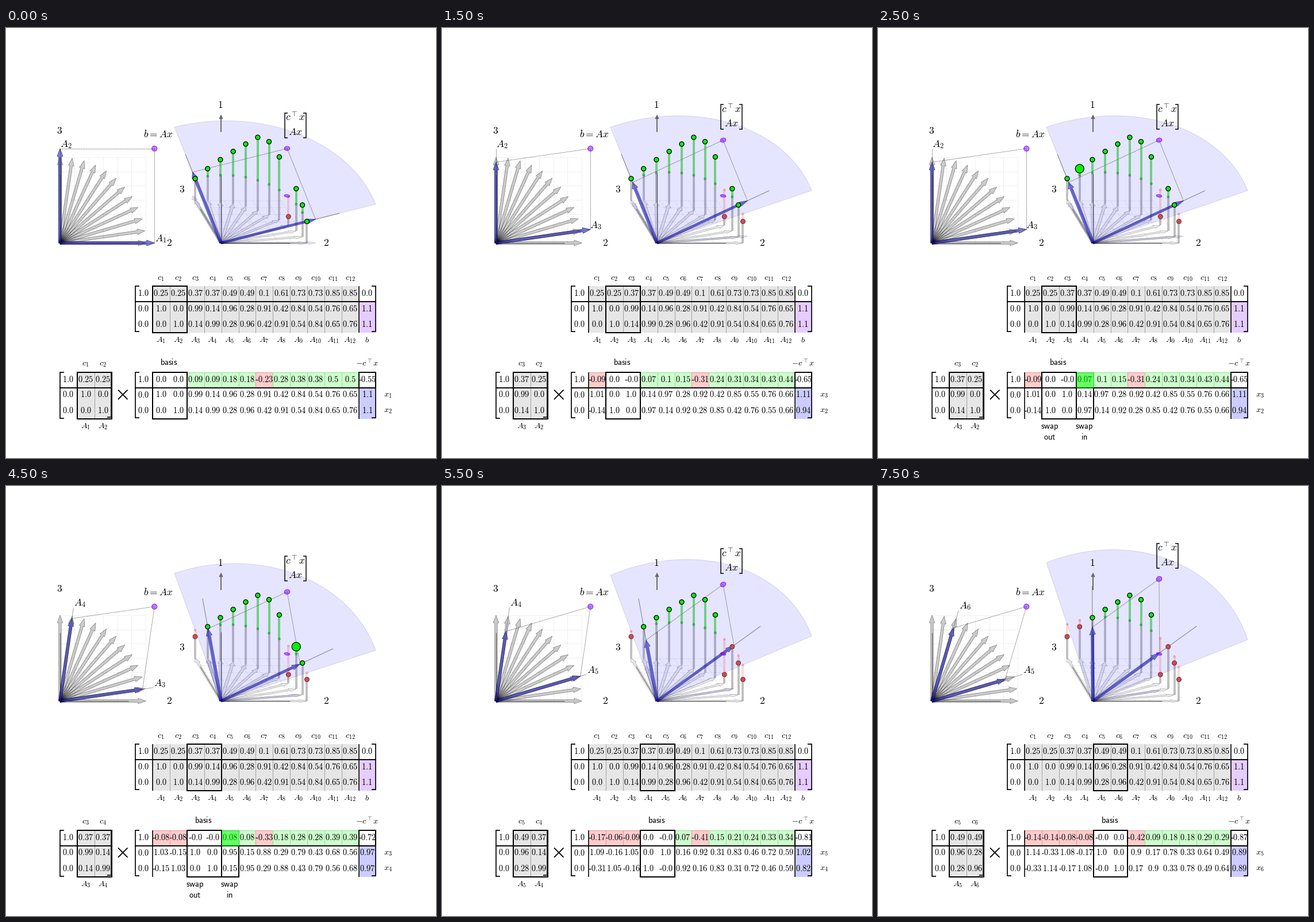
These frames come from a looping animation (748 px wide and 748 px high, 8000 ms). A matplotlib script:

```python
import matplotlib.pyplot as plt
import numpy as np
from matplotlib.animation import FuncAnimation
from matplotlib.patches import Circle, Rectangle

plt.rcParams["mathtext.fontset"] = "cm"

SIZE, DPI = 748, 88
PT = 72 / DPI  # points per pixel
SMALL, LARGE = 14.4, 17.5  # text sizes in pixels

# Linear program: minimise c.x subject to Ax = b, x >= 0
N = 12
ring = np.repeat(np.arange(N // 2), 2)
angle = ring * np.pi / 22
angle[1::2] = np.pi / 2 - angle[1::2]
A = np.array([np.cos(angle), np.sin(angle)])
c = 0.25 + 0.12 * ring
c[6] = 0.1
b = np.array([1.1, 1.1])

BASES = [(1, 2), (3, 2), (3, 4), (5, 4), (5, 6)]
SWAPS = [(1, 3), (2, 4), (3, 5), (4, 6)]  # (leaving, entering)
# Basic entries (row, column) that round to negative zero
NEG_ZERO = [set(), {(0, 3)}, {(0, 3), (0, 4)}, {(0, 5), (2, 5)}, {(0, 5), (2, 5)}]

# Table layout
COL0, COLB, RIGHT = 255, 614, 643
STEP = (COLB - COL0) / N
GREY, LINE_GREY = (0.9, 0.9, 0.9), (0.63, 0.63, 0.63)
PURPLE, BLUE = (0.9, 0.8, 1), (0.8, 0.8, 1)
GREEN_CELL, RED_CELL = (0.8, 1, 0.8), (1, 0.8, 0.8)

fig = plt.figure(figsize=(SIZE / DPI, SIZE / DPI), dpi=DPI, facecolor="white")
ax = fig.add_axes([0, 0, 1, 1])


def solve(basis):
    idx = [k - 1 for k in basis]
    inv = np.linalg.inv(A[:, idx])
    dual = c[idx] @ inv
    table = np.vstack([c - dual @ A, inv @ A])
    for row, k in enumerate(idx):
        table[:, k] = 0
        table[row + 1, k] = 1
    return idx, inv @ b, dual, table


# ---------- drawing helpers ----------

def line(xs, ys, color="black", width=1.0, z=2, **kw):
    kw.setdefault("solid_capstyle", "butt")
    ax.plot(xs, ys, color=color, lw=width * PT, zorder=z, **kw)


def text(x, y, s, size=SMALL, ha="center", z=20):
    ax.text(x, y, f"${s}$", fontsize=size * PT, ha=ha, va="baseline", zorder=z)


def sans(x, y, s):
    text(x, y, rf"\mathsf{{{s}}}")


def number(x, y, value):
    s = str(round(float(value), 2))
    digits = s.lstrip("-")
    if s != digits:
        half = (0.5 * (len(digits) - 1) + 0.278) / 2 * SMALL
        line([x - half - 1.9, x - half + 1.9], [y - 3.4] * 2, width=1.2, z=20)
        x += 0.167 * SMALL
    sans(x, y, digits)


def box(x0, y0, x1, y1, face="none", edge="none", width=1.0, z=2):
    ax.add_patch(Rectangle((x0, y0), x1 - x0, y1 - y0, facecolor=face,
                           edgecolor=edge, lw=width * PT, zorder=z))


def dot(x, y, r, face, edge, width=1.0, z=12):
    ax.add_patch(Circle((x, y), r, facecolor=face, edgecolor=edge,
                        lw=width * PT, zorder=z))


def bracket(x, y0, y1, serif, width=1.7):
    line([x + serif, x, x, x + serif], [y0, y0, y1, y1], width=width, z=8,
         solid_joinstyle="miter")


def shape(points, face, edge, width=0.8, z=3):
    ax.fill(*points, facecolor=face, edgecolor=edge, lw=width * PT, zorder=z)


# ---------- projections ----------

def flat(x, y):
    return 94 + 149.3 * np.asarray(x), 374 - 149.3 * np.asarray(y)


def space(x, y, h=0):
    x, y, h = np.asarray(x), np.asarray(y), np.asarray(h)
    return 374 + 149.5 * x - 45 * y, 374 - 74.5 * y - 150 * h


def on_plane(dual):
    return lambda x, y: space(x, y, dual[0] * np.asarray(x) + dual[1] * np.asarray(y))


def arrow(tip, proj, face, edge, z, width=0.8):
    """Flat arrow from the origin, lying in the projected plane."""
    length = np.hypot(*tip)
    u = np.asarray(tip) / length
    neck = length - 0.09
    along = np.array([0, neck, neck, length, neck, neck, 0])
    across = np.array([1, 1, 2.1, 0, -2.1, -1, -1]) * 0.0155
    shape(proj(along * u[0] - across * u[1], along * u[1] + across * u[0]),
          face, edge, width, z)


def disc(proj, z):
    t = np.linspace(0, 2 * np.pi, 40)
    shape(proj(b[0] + 0.03 * np.cos(t), b[1] + 0.03 * np.sin(t)),
          (0.5, 0, 1, 0.5), (0.5, 0, 1, 0.75), 1.2, z)


def grid(proj):
    for g in np.arange(7) / 6:
        for xs, ys in (([0, 1], [g, g]), ([g, g], [0, 1])):
            line(*proj(xs, ys), color=(0, 0, 0, 0.07), width=0.8, z=1)


def axis_lines(proj):
    for xs, ys in (([0, 0.8], [0, 0]), ([0, 0], [0, 0.8])):
        line(*proj(xs, ys), color=(0, 0, 0, 0.6), width=1, z=4)


def parallelogram(idx, x, proj, z):
    for k, v in zip(idx, x):
        tip = v * A[:, k]
        line(*proj([tip[0], b[0]], [tip[1], b[1]]), color=(0, 0, 0, 0.6),
             width=0.8, z=z, linestyle=(0, (2.5, 1.2)))


# ---------- the two plots ----------

def draw_flat(idx, x):
    grid(flat)
    axis_lines(flat)
    for k in range(N):
        arrow(A[:, k], flat, (0, 0, 0, 0.2), (0, 0, 0, 0.4), 3)
    for k, v in zip(idx, x):
        end = 1.1 * A[:, k]
        line(*flat([0, end[0]], [0, end[1]]), color=(0, 0, 0, 0.45), width=0.8, z=3)
        arrow(v * A[:, k], flat, (0.1, 0.1, 0.75, 0.55), (0, 0, 0.2, 0.6), 5, 1)
        px, py = flat(*end)
        text(px + 0.5, py - 3, f"A_{{{k + 1}}}", LARGE, "left")
    parallelogram(idx, x, flat, 4)
    disc(flat, 6)
    text(239, 190, "b = Ax", LARGE, "left")
    text(93.5, 184, "3", LARGE)
    text(284, 379, "2", LARGE)


def draw_space(idx, x, dual, cost, entering):
    plane = on_plane(dual)
    grid(space)
    axis_lines(space)
    line([374, 374], [374, 254], color=(0, 0, 0, 0.65), width=1.1, z=4)
    for k in range(N):
        arrow(A[:, k], space, (0, 0, 0, 0.07), (0, 0, 0, 0.27), 2)
    for k, v in zip(idx, x):
        arrow(v * A[:, k], space, (0, 0, 0.7, 0.1), (0, 0, 0.3, 0.2), 2)

    # dual cone surface
    t = np.linspace(0, np.pi / 2, 80)
    rim = 1.8 * np.array([np.r_[0, np.cos(t)], np.r_[0, np.sin(t)]])
    shape(plane(*rim), (0, 0, 1, 0.1), (0, 0, 0.3, 0.15), 0.8, 5)

    for k in range(N):
        px, base = space(*A[:, k])
        top = base - 150 * c[k]
        level = float(plane(*A[:, k])[1])
        basic = k in idx
        low = cost[k] < 0 or (basic and k == 4)
        line([px, px], [base, max(top, level)], color=(0, 0, 0, 0.25), width=3.8, z=4)
        if not basic:
            tint = (1, 0, 0, 0.15) if low else (0, 0.72, 0.05, 0.5)
            line([px, px], [level, top], color=tint, width=4, z=9)
            rim_tint = (1, 0, 0, 0.2) if low else (0, 0.55, 0.05, 0.6)
            dot(px, level, 1.8, tint, rim_tint, 0.9, 9)
        if k + 1 == entering:
            dot(px, top, 7.5, (0, 0.96, 0.03), "black", 1.2)
        elif low:
            dot(px, top, 3.9, (0.8, 0.3, 0.32), (0.45, 0.15, 0.17), 1)
        else:
            dot(px, top, 4, (0, 0.96, 0.03), "black", 1.3)

    for k, v in zip(idx, x):
        end = 1.378 * A[:, k]
        line(*plane([0, end[0]], [0, end[1]]), color=(0, 0, 0, 0.45), width=1, z=6)
        arrow(v * A[:, k], plane, (0.1, 0.1, 0.8, 0.55), (0, 0, 0.4, 0.5), 8, 1)
    parallelogram(idx, x, plane, 7)
    disc(space, 10)
    disc(plane, 10)

    # axis arrow and labels
    line([374, 374], [181, 157], color=(0.4, 0.4, 0.42), width=1.9, z=6)
    shape(([370.8, 374, 377.2], [158, 151, 158]), (0.4, 0.4, 0.42), (0.4, 0.4, 0.42), 0.5, 6)
    text(372.5, 139, "1", LARGE)
    text(557, 379, "2", LARGE)
    text(306.5, 286, "3", LARGE)

    y = float(plane(*b)[1])
    bracket(485.5, y - 62, y - 19, 5, 1.5)
    bracket(522, y - 62, y - 19, -5, 1.5)
    text(503.5, y - 48.5, r"c^\top x", LARGE)
    text(503.5, y - 24, "Ax", LARGE)


# ---------- the tables ----------

def column(k):
    return COL0 + STEP * k


def center(k):
    return column(k) + STEP / 2 - 0.5


def frame_table(top):
    mid, bottom = top + 27, top + 81
    bracket(225, top, bottom - 2, 7)
    bracket(RIGHT, top, bottom - 2, -7)
    line([224, RIGHT + 1], [mid, mid], width=1.9, z=7)
    for x in (COL0, COLB):
        line([x, x], [top, bottom], width=1.6, z=7)
    for row, v in enumerate((1, 0, 0)):
        number(239, top + 17 + 27 * row, float(v))


def draw_upper(idx):
    top = 449
    box(COL0, top, COLB, top + 81, GREY)
    box(COLB, top + 27, RIGHT, top + 81, PURPLE)
    for k in range(N):
        line([column(k)] * 2, [top, top + 81], LINE_GREY, 1, 3)
        text(center(k), 439, f"c_{{{k + 1}}}")
        text(center(k), 547, f"A_{{{k + 1}}}")
        for row, v in enumerate((c[k], *A[:, k])):
            number(center(k), top + 17 + 27 * row, v)
    frame_table(top)
    for row, v in enumerate((0.0, *b)):
        number(628, top + 17 + 27 * row, v)
    text(628, 547, "b")
    left = min(idx)
    box(column(left), top, column(left + 2), top + 81, edge="black", width=2, z=8)


def draw_basis_matrix(idx):
    top, x0, x1 = 599, 124, 184
    box(x0, top, x1, top + 81, GREY)
    line([154, 154], [top, top + 81], LINE_GREY, 1, 3)
    box(x0, top, x1, top + 81, edge="black", width=2, z=8)
    bracket(94, top, top + 80, 7)
    bracket(183, top, top + 78, -7)
    line([93, x1], [626, 626], width=1.9, z=7)
    for row, v in enumerate((1, 0, 0)):
        number(108, top + 16.5 + 27 * row, float(v))
    for x, k in zip((138.5, 168.5), idx):
        text(x, 588, f"c_{{{k + 1}}}")
        text(x, 697, f"A_{{{k + 1}}}")
        for row, v in enumerate((c[k], *A[:, k])):
            number(x, top + 16.5 + 27 * row, v)
    line([195, 211.5], [629.5, 646], width=1.8)
    line([195, 211.5], [646, 629.5], width=1.8)


def draw_lower(idx, x, table, neg_zero, swap):
    top, mid, bottom = 599, 626, 680
    box(COLB, mid, RIGHT, bottom, BLUE)
    for k in range(N):
        if k not in idx:
            low = table[0, k] < 0
            box(column(k), top, column(k + 1), mid, RED_CELL if low else GREEN_CELL,
                (0.9, 0.6, 0.6) if low else (0.6, 0.86, 0.6), 1, 3)
        for row in range(3):
            v = -0.0 if (row, k + 1) in neg_zero else table[row, k]
            number(center(k), top + 16.5 + 27 * row, v)
    frame_table(top)
    box(COLB, top, RIGHT, mid, edge="black", width=1.9, z=8)
    for row, v in enumerate((-(c[idx] @ x), *x)):
        number(628.5, top + 16.5 + 27 * row, v)
    left = min(idx)
    box(column(left), top, column(left + 2), bottom, edge="black", width=2, z=8)
    sans(column(left + 1) - 1.5, 586, "basis")
    text(628, 588, r"-c^\top x")
    for row, k in enumerate(idx):
        text(664, 642 + 27 * row, f"x_{{{k + 1}}}")

    if swap:
        leave, enter = swap[0] - 1, swap[1] - 1
        box(column(enter), top, column(enter + 1), mid, (0, 1, 0, 0.5), (0, 0.6, 0, 0.5), 1, 21)
        box(column(enter), mid, column(enter + 1), bottom, edge="black", width=2, z=8)
        for k, word in ((leave, "out"), (enter, "in")):
            sans(center(k) - 0.5, 697, "swap")
            sans(center(k) - 0.5, 716, word)


def draw(frame):
    ax.cla()
    ax.set_axis_off()
    ax.set_xlim(0, SIZE)
    ax.set_ylim(SIZE, 0)
    ax.autoscale(False)

    step = (frame + 1) // 2
    state, swapping = divmod(step, 2)
    swap = SWAPS[state] if swapping else None
    idx, x, dual, table = solve(BASES[state])
    draw_flat(idx, x)
    draw_space(idx, x, dual, table[0], swap[1] if swap else None)
    draw_upper(idx)
    draw_basis_matrix(idx)
    draw_lower(idx, x, table, NEG_ZERO[state], swap)
    return []


anim = FuncAnimation(fig, draw, frames=16, interval=500, repeat=True, init_func=lambda: [])
plt.show()
```
